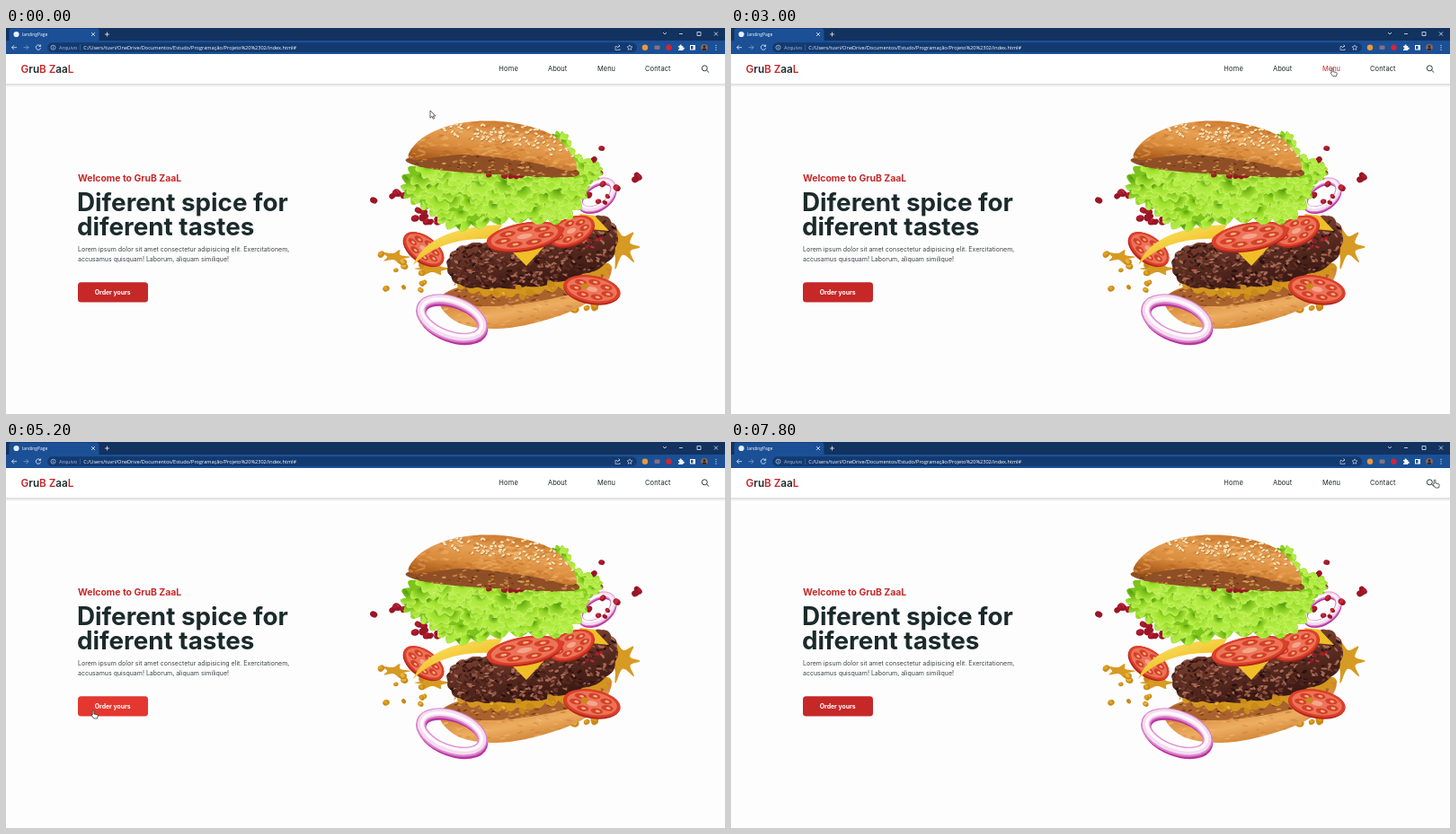
An HTML page with a canvas for the animation above (8000 ms loop, 800 by 430 pixels).

```html
<!DOCTYPE html>
<html lang="pt">
<head>
<meta charset="utf-8">
<title>landingPage</title>
<style>
html, body { margin: 0; width: 100%; height: 100%; overflow: hidden; background: #fefdfe; }
canvas, svg { position: absolute; left: 0; top: 0; width: 800px; height: 430px; display: block; }
text { font-family: Inter, "Open Sans", sans-serif; white-space: pre; }
.ui { font: 5.58px "Open Sans", "Noto Sans", sans-serif; fill: #fff; }
.line { fill: none; stroke: #e8eef7; stroke-width: .8; }
.thin { stroke-width: .6; }
.red { fill: #c62828; }
.logo { font-size: 11.7px; font-weight: 600; fill: #1c2b2b; }
.nav { font-size: 7.5px; fill: #1f2626; }
.nav.on { fill: #c62828; }
.h1 { font-size: 27.8px; font-weight: 700; fill: #1b2a2a; }
.p { font-size: 7px; fill: #3c4545; }
</style>
</head>
<body>
<canvas id="food" width="800" height="430"></canvas>
<svg viewBox="0 0 800 430">
  <defs>
    <linearGradient id="shade" x2="0" y2="1">
      <stop stop-opacity=".14"/><stop offset="1" stop-opacity="0"/>
    </linearGradient>
  </defs>

  <!-- browser -->
  <rect width="800" height="15" fill="#12325f"/>
  <rect y="14" width="800" height="15" fill="#1b5096"/>
  <rect x="3.5" y=".5" width="100" height="18" rx="3" fill="#1b5096"/>
  <circle cx="11.5" cy="7" r="3.1" fill="#e6eefa"/>
  <text class="ui" x="18" y="8.8" style="font-size:4.95px">landingPage</text>
  <path class="line" d="M95 5l4 4m0-4l-4 4M112.500 4.500v5m-2.500-2.500h5"/>
  <path class="line" d="M731 5l2 2 2-2M749 6.500h4M769 4.500h4v4h-4ZM788 4.500l4 4m0-4l-4 4"/>
  <path class="line" d="M12 21.700H6.500m2.500-2.500l-2.500 2.500 2.500 2.500"/>
  <path class="line" opacity=".5" d="M19.500 21.700H25m-2.500-2.500l2.500 2.500-2.500 2.500"/>
  <path class="line" d="M38 19.800a2.700 2.700 0 1 0 .6 2.500M38.600 18.500v2h-2"/>
  <rect x="46" y="16.300" width="656" height="10.800" rx="5.400" fill="#133a70"/>
  <circle class="line thin" cx="52.500" cy="21.700" r="2.500"/>
  <path class="line thin" d="M52.500 21.300v1.700m0-3v.6"/>
  <text class="ui" x="59" y="23.600" style="fill:#a9bedb">Arquivo</text>
  <rect x="82.500" y="18.500" width=".5" height="6.500" fill="#5d7ca8"/>
  <text class="ui" x="86.300" y="23.600">C:/Users/tuvri/OneDrive/Documentos/Estudo/Programação/Projeto%20%2302/index.html#</text>
  <path class="line thin" d="M680 20.500h-2v4h5V23M680 22.500q.5-2.500 3-2.500m-1.500-1.500l1.500 1.500-1.500 1.500"/>
  <path class="line thin" d="M694 18.900l.9 1.900 2 .2-1.500 1.400.4 2-1.800-1-1.800 1 .4-2-1.500-1.400 2-.2Z"/>
  <circle cx="711" cy="21.700" r="3.200" fill="#ec9a35"/>
  <rect x="721.500" y="19.500" width="6" height="4.600" rx="1" fill="#86717f"/>
  <circle cx="737.500" cy="21.700" r="3.200" fill="#cf2637"/>
  <path fill="#f4f7fc" d="M748 20h1.600a1.100 1.100 0 1 1 2.100 0h1.500v1.700a1.100 1.100 0 1 1 0 2V25H748v-1.600a1 1 0 1 0 0-1.900Z"/>
  <rect x="761" y="19" width="6" height="5.500" fill="#fff"/><rect x="762" y="20" width="2.500" height="3.500" fill="#1b5096"/>
  <circle cx="777" cy="21.700" r="3.800" fill="#8a6c5a"/>
  <circle cx="777" cy="20.500" r="1.500" fill="#30292b"/><ellipse cx="777" cy="23.700" rx="2.400" ry="1.500" fill="#30292b"/>
  <path d="M790 18.900v6" stroke="#fff" stroke-dasharray="1 1.400"/>

  <!-- page -->
  <rect y="62" width="800" height="4" fill="url(#shade)"/>
  <rect y="29" width="800" height="33" fill="#fff"/>
  <text class="logo" x="16.500" y="50"><tspan class="red">G</tspan>ru<tspan class="red">B Z</tspan>aa<tspan class="red">L</tspan></text>
  <text class="nav" x="548.300" y="48.200" letter-spacing=".2">Home</text>
  <text class="nav" x="603" y="48.200">About</text>
  <text class="nav" x="658" y="48.200">Menu</text>
  <text class="nav" x="711" y="48.200" letter-spacing=".12">Contact</text>
  <g fill="none" stroke="#1f2626" stroke-width=".9"><circle cx="777.300" cy="44.800" r="3"/><path d="M779.500 47l2.700 2.600"/></g>

  <text class="red" x="80" y="171.300" font-size="10.400" font-weight="700">Welcome to GruB ZaaL</text>
  <text class="h1" x="79" y="204">Diferent spice for</text>
  <text class="h1" x="79" y="231">diferent tastes</text>
  <text class="p" x="80" y="249.300">Lorem ipsum dolor sit amet consectetur adipisicing elit. Exercitationem,</text>
  <text class="p" x="80" y="259.800">accusamus quisquam! Laborum, aliquam similique!</text>
  <rect id="btn" x="80" y="283.300" width="78" height="22.200" rx="3.500"/>
  <text x="98.700" y="296.900" font-size="6.900" font-weight="700" fill="#fff">Order yours</text>

  <g id="cursor" stroke="#222" stroke-width=".7" fill="#fff" stroke-linejoin="round">
    <path d="M0 0V8.200L2 6.400 3.300 9.300 4.600 8.700 3.300 6H5.800Z"/>
    <path d="M1 0a.9.9 0 0 1 .9.9V4l3.500.7q1 .3.800 1.400L5.600 9H1.800L-.8 5.600q0-1 1-.6V.9A.9.9 0 0 1 1 0Z"/>
    <path fill="none" d="M-1.500-4.500h3M0-4.500v9M-1.500 4.500h3"/>
  </g>
</svg>
<script>
const c = document.getElementById('food').getContext('2d');
const TAU = Math.PI * 2;
let seed = 11;
const rnd = () => (seed = (seed * 16807) % 2147483647) / 2147483647;
const span = (a, b) => a + (b - a) * rnd();
const pick = list => list[Math.floor(rnd() * list.length)];
const clamp = v => Math.min(1, Math.max(0, v));

const greens = ['#8fd41e', '#9be02a', '#7fc51b', '#a9e63a'];
const golds = ['#e9b436', '#dda324', '#c98a1a'];
const reds = ['#c92a3b', '#b01c2e', '#9a1626'];
const crusts = ['rgba(250,200,130,.35)', 'rgba(155,75,18,.2)', 'rgba(238,170,92,.35)'];
const crumbs = ['#c5823f', '#8b4a1f', '#d79a57', '#6f3717'];
const meats = ['#2b110d', '#6d3729', '#8d5140', '#45201a', '#54281f', '#a96a55'];

function grad(x0, y0, x1, y1, ...cols) {
  const g = c.createLinearGradient(x0, y0, x1, y1);
  cols.forEach((col, i) => g.addColorStop(i / (cols.length - 1), col));
  return g;
}
function fill(path, col) {
  c.fillStyle = col;
  c.fill(path);
  return path;
}
function oval(x, y, rx, ry, turn, col) {
  c.beginPath();
  c.ellipse(x, y, rx, ry, turn, 0, TAU);
  c.fillStyle = col;
  c.fill();
}
function ring(x, y, rx, ry, turn, col, width) {
  c.beginPath();
  c.ellipse(x, y, rx, ry, turn, 0, TAU);
  c.strokeStyle = col;
  c.lineWidth = width;
  c.stroke();
}
// smooth closed outline through a few points, with an optional ruffle
function blob(pts, wave = 0, lobes = 3) {
  const path = new Path2D(), n = pts.length;
  pts.forEach((p1, i) => {
    const p0 = pts[(i + n - 1) % n], p2 = pts[(i + 1) % n], p3 = pts[(i + 2) % n];
    for (let s = 0; s < 1; s += 1 / 24) {
      const [x, y] = [0, 1].map(k => p1[k] + s / 2 * (p2[k] - p0[k] + s * (2 * p0[k] - 5 * p1[k] + 4 * p2[k] - p3[k]
        + s * (3 * (p1[k] - p2[k]) + p3[k] - p0[k]))));
      const dx = p2[0] - p1[0], dy = p2[1] - p1[1], len = Math.hypot(dx, dy);
      const off = wave * (Math.abs(Math.sin(s * lobes * Math.PI)) - .5);
      path.lineTo(x + dy / len * off, y - dx / len * off);
    }
  });
  path.closePath();
  return path;
}
function within(path, draw) {
  c.save();
  c.clip(path);
  draw();
  c.restore();
}
function flecks(path, x0, y0, x1, y1, n, cols, rx, ry, turn = .4) {
  within(path, () => {
    for (let i = 0; i < n; i++)
      oval(span(x0, x1), span(y0, y1), span(rx / 2, rx), span(ry / 2, ry), span(-turn, turn), pick(cols));
  });
}
// hanging leaves, the upper ones over the lower ones
function frills(path, x0, y0, x1, y1, n) {
  within(path, () => {
    for (let i = 0; i < n; i++) {
      const x = span(x0, x1), y = y1 - (y1 - y0) * i / n, r = span(8, 15), tilt = span(-.9, .9);
      c.beginPath();
      for (let a = 0; a <= 1.001; a += .04) {
        const k = r * (1 + .16 * Math.sin(a * 22 + i)), t = a * Math.PI + tilt;
        c.lineTo(x + Math.cos(t) * k, y + Math.sin(t) * k);
      }
      const g = c.createRadialGradient(x, y, 0, x, y, r * 1.1);
      g.addColorStop(0, '#4c960f');
      g.addColorStop(.45, pick(greens));
      g.addColorStop(1, '#b9ee4a');
      c.fillStyle = g;
      c.fill();
      c.strokeStyle = 'rgba(214,248,130,.6)';
      c.lineWidth = .8;
      c.stroke();
    }
  });
}
function bits(x0, y0, x1, y1, n, cols, size) {
  for (let i = 0; i < n; i++) {
    const x = span(x0, x1), y = span(y0, y1), r = span(size * .6, size);
    oval(x, y, r * 1.25, r, span(-1, 1), cols[2]);
    oval(x - r * .2, y - r * .25, r * .85, r * .6, span(-1, 1), pick(cols));
  }
}
function splat(x, y, rx, ry, arms) {
  const pts = Array.from({ length: arms * 2 }, (_, i) => {
    const k = i % 2 ? span(.35, .55) : span(.8, 1.05), a = i * Math.PI / arms;
    return [x + Math.cos(a) * rx * k, y + Math.sin(a) * ry * k];
  });
  fill(blob(pts), '#d79a22');
}
function tomato(x, y, rx, ry, turn) {
  c.save();
  c.translate(x, y);
  c.rotate(turn);
  oval(0, 1, rx, ry, 0, '#b3261c');
  oval(0, 0, rx, ry - 1, 0, '#dc3f2a');
  oval(0, 0, rx * .88, ry * .8, 0, '#ec7458');
  for (let a = .3; a < TAU; a += TAU / 7) {
    const px = Math.cos(a) * rx * .58, py = Math.sin(a) * ry * .52;
    oval(px, py, rx * .21, ry * .2, 0, '#d4402b');
    oval(px + 1, py, rx * .08, ry * .08, 0, '#f3b17a');
  }
  oval(0, 0, rx * .2, ry * .17, 0, '#f6a48a');
  c.restore();
}
function onion(x, y, rx, ry, turn, w) {
  ring(x + w * .1, y + w * .3, rx, ry, turn, '#b9359f', w * .85);
  ring(x, y, rx, ry, turn, '#db83cb', w);
  ring(x, y - w * .05, rx, ry, turn, '#f3dcef', w * .7);
  ring(x, y - w * .1, rx - 1, ry - 1, turn, '#fff8fd', w * .3);
}

function burger() {
  // behind
  onion(657, 186, 21, 13, -.6, 7);
  splat(684, 244, 27, 25, 7);
  splat(433, 255, 18, 9, 5);
  splat(474, 268, 24, 10, 6);
  bits(415, 250, 465, 292, 12, golds, 3.500);
  bits(620, 306, 660, 318, 5, golds, 4);
  bits(428, 182, 446, 191, 5, reds, 4);
  bits(452, 202, 486, 216, 12, reds, 4);
  bits(645, 134, 680, 198, 9, reds, 3.500);
  bits(688, 163, 713, 174, 3, reds, 4);
  bits(409, 191, 411, 193, 1, reds, 4);
  frills(fill(blob([[607, 124], [622, 118], [634, 140], [661, 154], [655, 170], [615, 174]], 4), '#86cf1c'), 605, 112, 662, 168, 26);

  // lower bun
  const base = blob([[482, 302], [520, 285], [590, 285], [667, 262], [666, 288], [630, 315], [560, 334], [505, 329]]);
  fill(base, grad(560, 275, 572, 336, '#b9692d', '#d88a3b', '#edae62', '#cf8032'));
  flecks(base, 483, 262, 670, 334, 240, crusts, 4, 1.300);
  const crumb = blob([[486, 298], [540, 284], [610, 281], [666, 262], [655, 286], [600, 303], [530, 310]]);
  fill(crumb, '#a9622c');
  flecks(crumb, 486, 262, 668, 310, 260, crumbs, 3, 1.300);
  fill(blob([[500, 284], [580, 286], [668, 262], [655, 281], [600, 293], [540, 298]], 5, 4), '#d3951d');

  // patty
  const patty = blob([[491, 266], [500, 247], [530, 239], [585, 241], [635, 222], [663, 209], [680, 228], [668, 262], [610, 284], [550, 290], [505, 286]], 2, 2);
  fill(patty, grad(570, 225, 585, 292, '#7c4232', '#55291f', '#371711'));
  flecks(patty, 490, 208, 681, 292, 900, meats, 3.500, 1.600, 1);
  flecks(patty, 645, 232, 665, 245, 7, reds, 3, 2);

  // cheese and slices
  tomato(465, 246, 26, 15, .63);
  const sheet = grad(480, 222, 490, 255, '#fbe262', '#f0bf27');
  fill(new Path2D('M453 264Q470 222 552 219L543 235Q485 232 453 264Z'), sheet);
  fill(new Path2D('M638 207L655 209 671 226 650 224ZM560 246L602 240 579 265Z'), sheet);
  tomato(629, 226, 27, 16, -.4);
  tomato(577, 232, 43, 16, -.17);

  // front lettuce
  const green = blob([[458, 153], [540, 158], [634, 166], [646, 182], [620, 214], [560, 214], [500, 223], [470, 203], [443, 183]], 7, 3);
  fill(green, '#7cc41a');
  frills(green, 440, 148, 650, 222, 150);
  bits(535, 161, 618, 166, 10, reds, 4);

  // upper bun
  const under = blob([[451, 144], [520, 138], [600, 148], [635, 158], [628, 166], [560, 164], [490, 159], [452, 152]]);
  fill(under, '#8f4f26');
  flecks(under, 450, 136, 636, 167, 200, crumbs, 3, 1.200);
  const dome = blob([[450, 146], [464, 122], [506, 106], [560, 105], [612, 122], [634, 158], [580, 149], [510, 141]]);
  fill(dome, grad(540, 104, 532, 154, '#cf7d31', '#e7a053', '#d98b3c', '#ad5d1c'));
  flecks(dome, 448, 103, 638, 160, 280, crusts, 5, 1.500);
  for (let n = 0; n < 85;) {
    const x = span(480, 632), y = span(106, 154), a = span(-1, 1);
    if (y > 108 + (x - 440) * .2 || !c.isPointInPath(dome, x, y)) continue;
    oval(x + .4, y + .6, 2.200, 1.300, a, '#b56b28');
    oval(x, y, 2.100, 1.200, a, '#f8e1b3');
    n++;
  }

  // in front
  tomato(652, 291, 32, 16, .17);
  onion(496, 323.500, 36, 19, .35, 11);
  bits(528, 284, 645, 304, 9, golds, 4);
}
burger();

// cursor moves: start, end, x, y
const moves = [
  [100, 700, 557, 48], [1200, 1300, 560, 46], [1300, 2100, 788, 44], [2400, 3200, 628, 45],
  [3500, 4200, 237, 218], [4300, 4800, 96, 299], [6400, 6800, 553, 227], [6800, 7300, 782, 42]
];
function cursorAt(t) {
  let x = 472, y = 92;
  for (const [from, to, tx, ty] of moves) {
    const p = clamp((t - from) / (to - from));
    x += (tx - x) * p;
    y += (ty - y) * p;
  }
  return [x, y];
}

const links = [...document.querySelectorAll('.nav')];
const zones = links.map(el => [+el.getAttribute('x') - 2, 39, +el.getAttribute('x') + 26, 53]);
const btn = document.getElementById('btn');
const cursor = document.getElementById('cursor');

function show(ms) {
  const t = Math.floor(ms / 100) * 100;
  const [x, y] = cursorAt(t);
  const over = ([x0, y0, x1, y1]) => x >= x0 && x <= x1 && y >= y0 && y <= y1;
  const link = zones.findIndex(over);
  links.forEach((el, i) => el.classList.toggle('on', i === link));
  const glow = clamp((t - 4600) / 400) - clamp((t - 6500) / 400);
  btn.setAttribute('fill', `rgb(${198 + 29 * glow},${40 + 15 * glow},${40 + 8 * glow})`);
  const hand = link >= 0 || over([772, 39, 790, 53]) || over([80, 283, 158, 306]);
  const kind = hand ? 1 : over([80, 181, 318, 262]) ? 2 : 0;
  [...cursor.children].forEach((el, i) => el.setAttribute('visibility', i === kind ? 'visible' : 'hidden'));
  cursor.setAttribute('transform', `translate(${x} ${y})`);
}
function loop() {
  show(performance.now() % 8000);
  requestAnimationFrame(loop);
}
loop();
</script>
</body>
</html>
```
